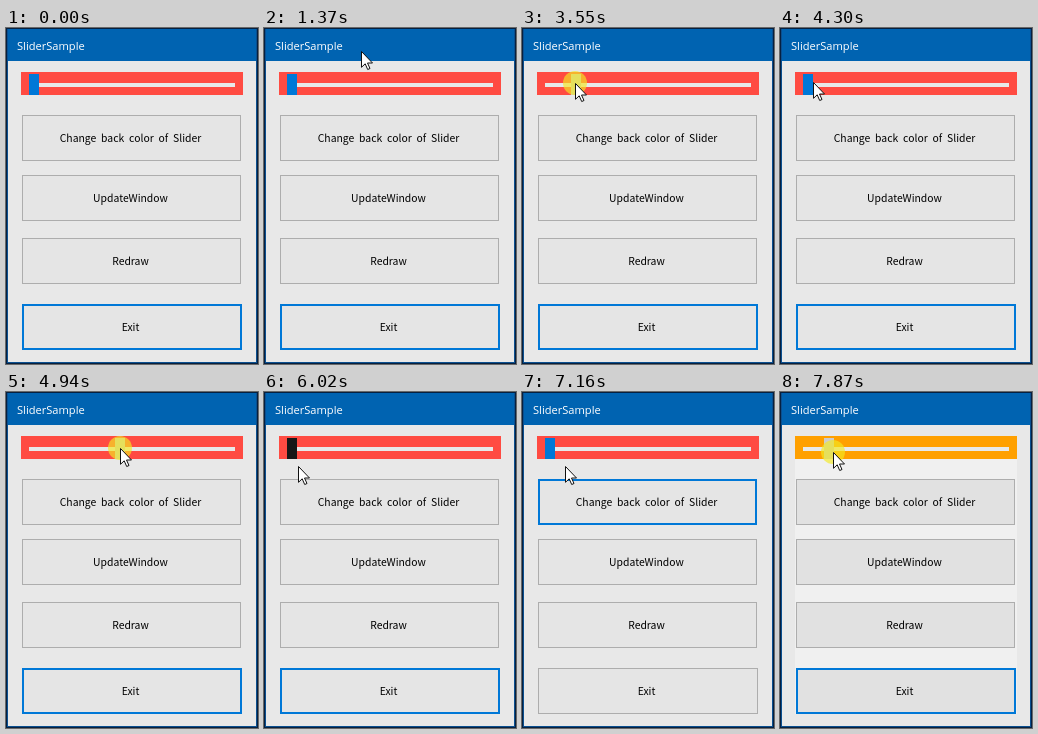
An HTML page for the animation above (8 s loop, 252 px wide and 336 px high).

```html
<!DOCTYPE html>
<html lang="en">
<head>
<meta charset="utf-8">
<title>SliderSample</title>
<style>
  html, body { margin: 0; width: 100%; height: 100%; overflow: hidden; background: #062040; }
  svg { display: block; width: 252px; height: 336px; }
  .title { font: 11.1px "Open Sans", "Noto Sans", sans-serif; fill: #fff; }
  .label { font: 10.4px "Noto Sans CJK JP", "Noto Sans CJK", "Noto Sans", sans-serif; word-spacing: 2.5px; text-anchor: middle; }
</style>
</head>
<body>
<svg viewBox="0 0 252 336">
  <rect x="1" y="1" width="250" height="334" fill="#0a4f8f"/>
  <rect x="2" y="1" width="248" height="32" fill="#0063b1"/>
  <rect x="2" y="33" width="248" height="301" fill="#e8e8e8"/>
  <rect id="repaint" x="15" y="67" width="222" height="255" fill="#f0f0f0"/>
  <text class="title" x="11" y="22">SliderSample</text>
  <rect id="slider" x="15" y="44" width="222" height="23"/>
  <rect x="23" y="55" width="206" height="4" fill="#e7e9e9"/>
  <rect id="thumb" y="46" width="10" height="21"/>
  <g id="buttons"></g>
  <circle id="press" r="12" fill="#f3ea20" opacity=".65"/>
  <path id="cursor" d="M.5.5V16.3L4.2 12.8 6.7 18.5 9 17.5 6.5 12H11.5Z" fill="#fff" stroke="#111"/>
</svg>
<script>
const LOOP = 8000, APPEAR = 1190, CLICK = 6820, RECOLOR = 7640;
const MIN = 23, REPAINT_LAG = 150, BLUE = "#0078d7";
const $ = id => document.getElementById(id);

// Eased pointer moves: start, end, x, y; the pointer rests in between
const moves = [
  [APPEAR, 1650, 53, 60],
  [2900, 3100, 27, 55],
  [3220, 3800, 69, 55],
  [4080, 4230, 27, 55],
  [4230, 4300, 33, 54],
  [4300, 4400, 28, 55],
  [4470, 5000, 117, 56],
  [5000, 5560, 28, 60],
  [5870, 6020, 34, 74],
  [6020, 6290, 64, 100],
  [6910, 7330, 32, 60],
  [RECOLOR, 7870, 53, 60]
];
const presses = [[3180, 4235], [4420, 5480], [CLICK, 6900], [RECOLOR, LOOP]];

const within = (v, a, b) => v >= a && v < b;
const show = on => on ? "visible" : "hidden";

function pointer(t) {
  let x = 119, y = 4;
  for (const [from, to, endX, endY] of moves) {
    const k = Math.min(1, Math.max(0, (t - from) / (to - from)));
    const ease = (1 - Math.cos(Math.PI * k)) / 2;
    x += (endX - x) * ease;
    y += (endY - y) * ease;
  }
  return [Math.round(x), Math.round(y)];
}

function overThumb(t) {
  const [x, y] = pointer(t);
  return within(x, MIN, MIN + 10) && within(y, 46, 67);
}

function set(el, attrs) {
  for (const name in attrs) el.setAttribute(name, attrs[name]);
}

function addButton(text, y, width = 219) {
  const ns = "http://www.w3.org/2000/svg";
  const box = document.createElementNS(ns, "rect");
  const label = document.createElementNS(ns, "text");
  set(label, { class: "label", x: 124.5, y: y + 27 });
  label.textContent = text;
  $("buttons").append(box, label);
  return (fill, stroke = "#adadad", line = 1) => set(box, {
    x: 16 + line / 2, y: y + line / 2, width: width - line, height: 46 - line,
    fill, stroke, "stroke-width": line
  });
}

const change = addButton("Change back color of Slider", 87);
const others = [addButton("UpdateWindow", 147), addButton("Redraw", 210)];
const exit = addButton("Exit", 276, 220);

function draw(t) {
  const [x, y] = pointer(t);
  const press = presses.find(([a, b]) => within(t, a, b));
  const overButton = within(x, 16, 235) && within(y, 87, 133);
  const dragging = press && !overButton;
  const thumbX = dragging ? MIN + Math.max(0, x - pointer(press[0])[0]) : MIN;
  const hot = overThumb(t) || overThumb(t - REPAINT_LAG);
  const changeFocus = within(t, CLICK, RECOLOR);
  const recolored = t >= RECOLOR;
  const face = recolored ? "#e1e1e1" : "#e5e5e5";
  const plain = [face], focused = [face, BLUE, 2];

  set($("repaint"), { visibility: show(recolored) });
  set($("slider"), { fill: recolored ? "#ffa000" : "#ff4b42" });
  set($("thumb"), { x: thumbX, fill: dragging ? "#ccc" : hot ? "#171717" : BLUE });
  change(...(overButton
    ? press ? ["#cce4f7", "#005499"] : ["#e5f1fb", BLUE]
    : changeFocus ? focused : plain));
  others.forEach(paint => paint(...plain));
  exit(...(changeFocus ? plain : focused));
  set($("press"), { cx: x, cy: y, visibility: show(press) });
  set($("cursor"), { transform: `translate(${x} ${y})`, visibility: show(t >= APPEAR) });
}

const start = performance.now();
function tick(now) {
  draw(Math.max(0, now - start) % LOOP);
  requestAnimationFrame(tick);
}
draw(0);
requestAnimationFrame(tick);
</script>
</body>
</html>
```
